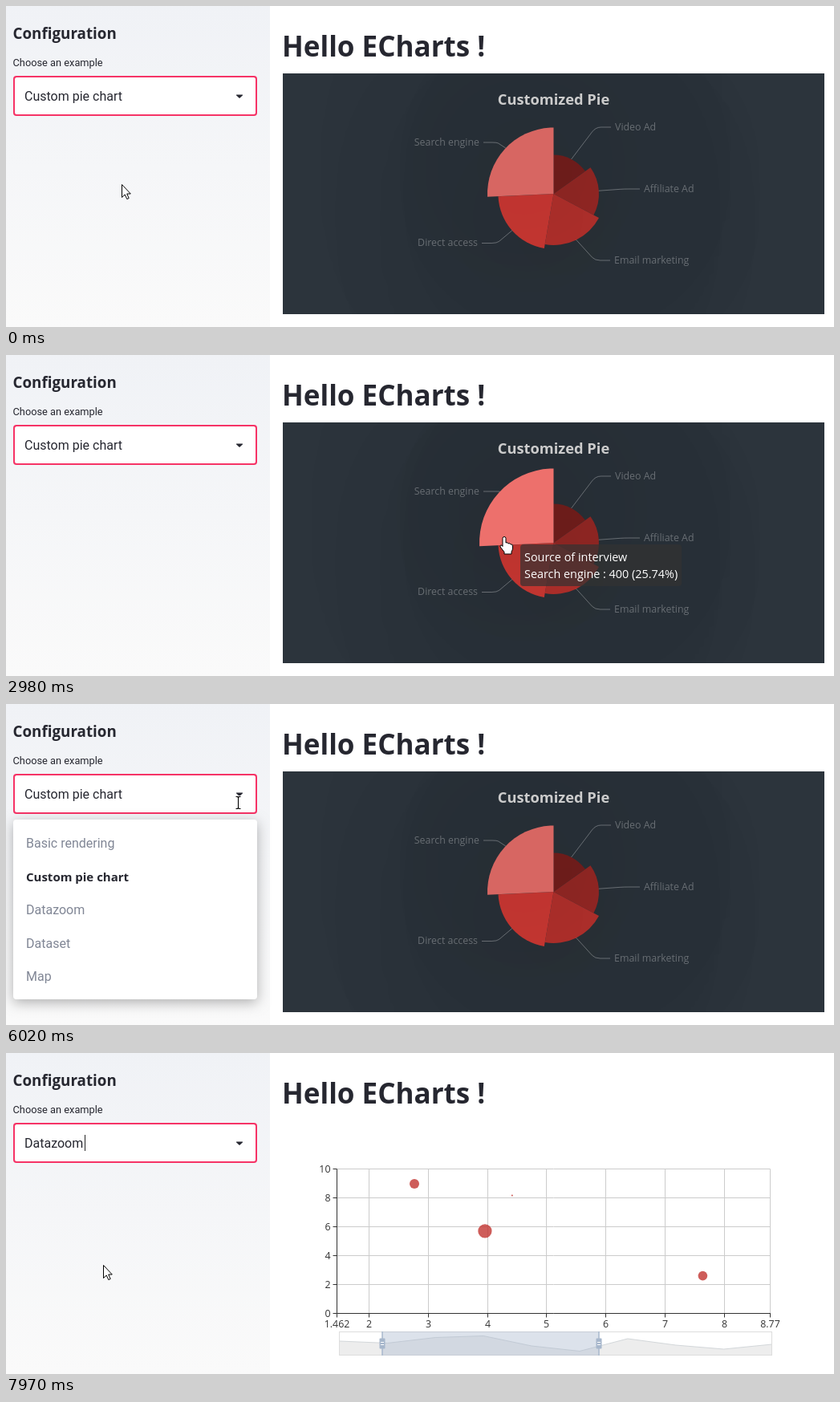
An HTML page with a canvas that plays this animation: 1032x400 px, repeating every 8 s.

```html
<!DOCTYPE html>
<html lang="en">
<head>
<meta charset="utf-8">
<title>Hello ECharts !</title>
<style>
html, body { margin: 0; width: 100%; height: 100%; overflow: hidden; background: #fff; }
canvas { display: block; width: 1032px; height: 400px; }
</style>
</head>
<body>
<canvas id="stage" width="1032" height="400"></canvas>
<script>
const LOOP = 8000, TAU = Math.PI * 2;
const ctx = document.getElementById('stage').getContext('2d');
const PLAIN = 'Roboto, sans-serif', WIDE = '"Open Sans", "Noto Sans", sans-serif';
const INK = '#262730';

// Moments of the interaction
const SEARCH_ON = 2500, DIRECT_ON = 3060, HOVER_OFF = 4290, TIP_OFF = 4390;
const MENU_ON = 5490, MENU_OFF = 7170, CLEAR = 7830, SCATTER = 7895;

const clamp = k => Math.max(0, Math.min(1, k));
const smooth = k => k * k * (3 - 2 * k);
const within = (t, a, b) => t >= a && t < b;

function elastic(k) {
  k = clamp(k);
  return k === 1 ? 1 : 1 + 2 ** (-10 * k) * Math.sin((k - 0.1) * TAU / 0.4);
}

// Keys are [time, x, y, eased]
function along(keys, t) {
  let i = 0;
  while (i < keys.length - 1 && keys[i + 1][0] <= t) i++;
  const a = keys[i], b = keys[i + 1] || a;
  let k = b === a ? 0 : clamp((t - a[0]) / (b[0] - a[0]));
  if (b[3]) k = smooth(k);
  return [a[1] + (b[1] - a[1]) * k, a[2] + (b[2] - a[2]) * k];
}

const POINTER = [
  [0, 144, 222], [1070, 144, 222], [1830, 250, 126, 1], [1850, 250, 126], [1910, 262, 120],
  [2210, 553, 188, 1], [2390, 553, 188], [2520, 616, 195, 1], [2620, 617, 196], [2800, 619, 200],
  [3140, 623, 250, 1], [4180, 623, 250], [4890, 336, 158, 1], [4970, 317, 148], [5110, 300, 132],
  [5400, 289, 120, 1], [5710, 289.5, 121, 1], [6005, 289.5, 121], [6020, 289.5, 123],
  [6780, 96, 255, 1], [7190, 93, 263, 1], [7790, 93, 263], [7970, 121, 264, 1], [8000, 121, 264]
];
const TIP = [
  [SEARCH_ON, 683, 234], [2590, 683, 234], [2720, 645, 219], [2900, 640, 222],
  [3140, 643, 262], [3400, 643, 269, 1], [8000, 643, 269]
];

function text(str, x, y, size, family, color, align = 'left', weight = 400) {
  ctx.font = `${weight} ${size}px ${family}`;
  ctx.fillStyle = color;
  ctx.textAlign = align;
  ctx.fillText(str, x, y);
}

function line(color, width, ...pts) {
  ctx.strokeStyle = color;
  ctx.lineWidth = width;
  ctx.beginPath();
  pts.forEach(p => ctx.lineTo(p[0], p[1]));
  ctx.stroke();
}

function box(x, y, w, h, r, color) {
  ctx.fillStyle = color;
  ctx.beginPath();
  ctx.roundRect(x, y, w, h, r);
  ctx.fill();
}

// ---- Pie ----
const PANEL = { x: 345, y: 84, w: 675, h: 300 };
const CENTER = [682.5, 234];
const slices = [
  { name: 'Video Ad', value: 235, bend: [735, 151], end: 754, x: 759 },
  { name: 'Affiliate Ad', value: 274, bend: [770, 228], end: 790, x: 795 },
  { name: 'Email marketing', value: 310, bend: [734, 317], end: 753, x: 758 },
  { name: 'Direct access', value: 335, bend: [612, 295.5], end: 593, x: 588, on: DIRECT_ON, off: HOVER_OFF },
  { name: 'Search engine', value: 400, bend: [612, 170], end: 595, x: 590, on: SEARCH_ON, off: DIRECT_ON, delay: 90 }
];
const total = slices.reduce((sum, s) => sum + s.value, 0);
let turn = -Math.PI / 2;
for (const s of slices) {
  s.from = turn;
  s.to = turn += s.value / total * TAU;
  s.radius = s.value / 400 * 82.5;
}

function shade(value, gain) {
  const l = (value - 80) / 520, c = (1 - Math.abs(2 * l - 1)) * 0.597 / 2;
  const rgb = [l + c, l - c + 0.055 * c, l - c].map(v => Math.round(Math.min(1, v * gain) * 255));
  return `rgb(${rgb})`;
}

function grown(s, t) {
  if (!s.on || t < s.on) return s.radius;
  const up = elastic((t - s.on - (s.delay || 0)) / 300);
  return s.radius + 10 * (t < s.off ? up : 1 - elastic((t - s.off) / 300));
}

const pie = document.createElement('canvas');
pie.width = PANEL.w;
pie.height = PANEL.h;
const pctx = pie.getContext('2d');
let pieKey = '';

function renderPie(state) {
  const key = state.map(s => s.r.toFixed(1) + s.color).join();
  if (key === pieKey) return;
  pieKey = key;
  const cx = CENTER[0] - PANEL.x, cy = CENTER[1] - PANEL.y;
  pctx.shadowColor = 'transparent';
  pctx.fillStyle = '#2c343c';
  pctx.fillRect(0, 0, PANEL.w, PANEL.h);
  pctx.shadowBlur = 200;
  pctx.shadowColor = 'rgba(0,0,0,0.5)';
  state.forEach((s, i) => {
    pctx.fillStyle = s.color;
    pctx.beginPath();
    pctx.moveTo(cx, cy);
    pctx.arc(cx, cy, s.r, slices[i].from, slices[i].to);
    pctx.closePath();
    pctx.fill();
  });
}

function drawPie(t) {
  const state = slices.map(s => ({
    r: grown(s, t),
    color: shade(s.value, s.on && within(t, s.on, s.off) ? 1.1 : 1)
  }));
  renderPie(state);
  ctx.drawImage(pie, PANEL.x, PANEL.y);
  text('Customized Pie', 682.5, 123, 18.3, WIDE, '#ccc', 'center', 700);
  const faint = 'rgba(255,255,255,0.3)';
  slices.forEach((s, i) => {
    const mid = (s.from + s.to) / 2, [bx, by] = s.bend;
    const x = CENTER[0] + state[i].r * Math.cos(mid), y = CENTER[1] + state[i].r * Math.sin(mid);
    ctx.strokeStyle = faint;
    ctx.lineWidth = 1;
    ctx.beginPath();
    ctx.moveTo(x, y);
    ctx.lineTo(bx + (x - bx) * 0.15, by + (y - by) * 0.15);
    ctx.quadraticCurveTo(bx, by, bx + (s.end - bx) * 0.35, by);
    ctx.lineTo(s.end, by);
    ctx.stroke();
    text(s.name, s.x, Math.floor(by) + 4, 12.4, WIDE, faint, s.x < CENTER[0] ? 'right' : 'left');
  });
}

function drawTip(t) {
  if (!within(t, SEARCH_ON, TIP_OFF)) return;
  const [x, y] = along(TIP, t).map(Math.round);
  const s = slices[t < DIRECT_ON ? 4 : 3];
  const label = `${s.name} : ${s.value} (${(s.value / total * 100).toFixed(2)}%)`;
  ctx.font = `14.4px ${WIDE}`;
  box(x, y, ctx.measureText(label).width + 10, 52, 4, 'rgba(50,50,50,0.7)');
  text('Source of interview', x + 5, y + 21, 14.4, WIDE, '#fff');
  text(label, x + 5, y + 42, 14.4, WIDE, '#fff');
}

// ---- Scatter with zoom slider ----
const X0 = 1.462, X1 = 8.77, LEFT = 412.5, RIGHT = 952.5, TOP = 144.5, BASE = 324.5;
const px = v => LEFT + (v - X0) / (X1 - X0) * (RIGHT - LEFT);
const py = v => BASE - v / 10 * (BASE - TOP);
const crisp = v => Math.floor(v) + 0.5;
const dots = [[3.958, 5.701, 0.955], [2.768, 8.971, 0.669], [4.417, 8.167, 0.113], [7.632, 2.605, 0.645]];
const trend = [359, 361.5, 354.5, 352.5, 365, 371.5, 356, 364, 369, 363];

function drawScatter(t) {
  for (let v = 0; v <= 10; v += 2) {
    const y = py(v);
    line('#ccc', 1, [LEFT, y], [RIGHT, y]);
    line('#333', 1, [LEFT - 5, y], [LEFT, y]);
    text(v, 404.5, y + 4, 12.4, WIDE, '#333', 'right');
  }
  for (const v of [X0, 2, 3, 4, 5, 6, 7, 8, X1]) {
    const x = crisp(px(v));
    line('#ccc', 1, [x, TOP], [x, BASE]);
    line('#333', 1, [x, BASE], [x, BASE + 5]);
    text(v, x, 342, 12.4, WIDE, '#333', 'center');
  }
  line('#333', 1, [LEFT, TOP], [LEFT, BASE], [RIGHT + 0.5, BASE]);

  const grow = 0.45 * clamp((t - SCATTER) / 75);
  ctx.fillStyle = 'rgba(194,53,49,0.8)';
  for (const [x, y, size] of dots) {
    ctx.beginPath();
    ctx.arc(px(x), py(y), size * 20 * grow, 0, TAU);
    ctx.fill();
  }
  drawSlider();
}

function drawSlider() {
  const x = 415.5, y = 347.5, w = 539, h = 29;
  const pts = trend.map((v, i) => [x + w * i / 9, v]);
  ctx.fillStyle = '#ededed';
  ctx.beginPath();
  [...pts, [x + w, y + h], [x, y + h]].forEach(p => ctx.lineTo(p[0], p[1]));
  ctx.fill();
  line('#d3d7da', 1, ...pts);
  ctx.strokeStyle = '#ddd';
  ctx.strokeRect(x, y, w, h);
  ctx.fillStyle = 'rgba(167,183,204,0.4)';
  ctx.fillRect(469, 347, 270, 30);
  for (const hx of [469, 739]) {
    line('#a7b7cc', 1.5, [hx, 347], [hx, 377]);
    box(hx - 3.5, 355.5, 7, 13, 1, '#a7b7cc');
    line('#fff', 1, [hx - 2, 360.5], [hx + 2, 360.5]);
    line('#fff', 1, [hx - 2, 363.5], [hx + 2, 363.5]);
  }
}

// ---- Sidebar ----
const side = ctx.createLinearGradient(0, 0, 0, 400);
side.addColorStop(0, '#f0f2f6');
side.addColorStop(1, '#fafafa');
const options = ['Basic rendering', 'Custom pie chart', 'Datazoom', 'Dataset', 'Map'];

function drawSidebar(t) {
  ctx.fillStyle = side;
  ctx.fillRect(0, 0, 329, 400);
  text('Configuration', 8.5, 41, 18.8, WIDE, INK, 'left', 700);
  text('Choose an example', 8.5, 75, 12.8, PLAIN, INK);
  box(9, 87, 304, 50, 4, '#f63366');
  box(11, 89, 300, 46, 2.5, '#fff');

  const picked = t >= MENU_OFF;
  text(options[picked ? 2 : 1], 23, 118, 16, PLAIN, INK);
  const caret = picked
    ? within(t, MENU_OFF, 7680) || t >= 7940
    : within(t, MENU_ON, 6020) || within(t, 6550, 7080);
  if (caret) {
    const x = picked ? 98.5 : 147.5;
    line('#222', 1, [x, 102], [x, 122]);
  }
  ctx.fillStyle = INK;
  ctx.fill(new Path2D('M287.4 110.4H294.6Q295.4 110.6 294.8 111.4L291.6 114.6Q291 115.1 290.4 114.6L287.2 111.4Q286.6 110.6 287.4 110.4Z'));
}

function drawMenu(y) {
  ctx.save();
  ctx.shadowColor = 'rgba(0,0,0,0.3)';
  ctx.shadowBlur = 16;
  ctx.shadowOffsetY = 4;
  box(9, 144, 304, 224, 4, '#fff');
  ctx.restore();
  const hover = Math.floor((y - 153) / 41.5);
  options.forEach((name, i) => {
    const base = Math.round(179 + i * 41.5);
    if (i === 1) text(name, 25, base, 15, WIDE, INK, 'left', 700);
    else text(name, 25, base, 16, PLAIN, i === hover ? INK : '#808695');
  });
}

// ---- Pointer ----
const ARROW = new Path2D('M.5 .5V16.5L4.2 13L6.8 18.6L9.2 17.5L6.7 12H11.3Z');
const HAND = new Path2D('M-2 1.5Q-2 -.5 0 -.5T2 1.5V7Q4.5 5.8 5 8Q7.5 6.8 8 9Q10.5 8.3 10.5 11V14Q10.5 16 9 18V21H0V18.5L-5 12Q-5.5 9.5 -3 10L-2 11.5Z');
const BEAM = new Path2D('M-3 -7.5H-1L0 -6.5L1 -7.5H3M0 -6.5V6.5M-3 7.5H-1L0 6.5L1 7.5H3');

function drawPointer(t, x, y) {
  const inSide = x > 9 && x < 313;
  const beam = inSide && y > 87 && y < 137;
  const hand = within(t, SEARCH_ON, HOVER_OFF) ||
    (within(t, MENU_ON, MENU_OFF) && inSide && y > 144);
  ctx.save();
  ctx.translate(Math.round(x), Math.round(y));
  if (beam) {
    ctx.translate(0.5, 0);
    ctx.lineWidth = 2.6;
    ctx.strokeStyle = '#fff';
    ctx.stroke(BEAM);
  }
  ctx.lineWidth = beam ? 1.1 : 1;
  ctx.strokeStyle = '#000';
  ctx.lineJoin = 'round';
  if (!beam) {
    ctx.fillStyle = '#fff';
    ctx.fill(hand ? HAND : ARROW);
  }
  ctx.stroke(beam ? BEAM : hand ? HAND : ARROW);
  ctx.restore();
}

function draw(t) {
  const [x, y] = along(POINTER, t);
  ctx.fillStyle = '#fff';
  ctx.fillRect(0, 0, 1032, 400);
  drawSidebar(t);
  text('Hello ECharts !', 344, 63, 35, WIDE, INK, 'left', 700);
  if (t < CLEAR) {
    drawPie(t);
    drawTip(t);
  } else if (t >= SCATTER) {
    drawScatter(t);
  }
  if (within(t, MENU_ON, MENU_OFF)) drawMenu(y);
  drawPointer(t, x, y);
}

const start = performance.now();
function tick() {
  draw((performance.now() - start) % LOOP);
  requestAnimationFrame(tick);
}
tick();
</script>
</body>
</html>
```
